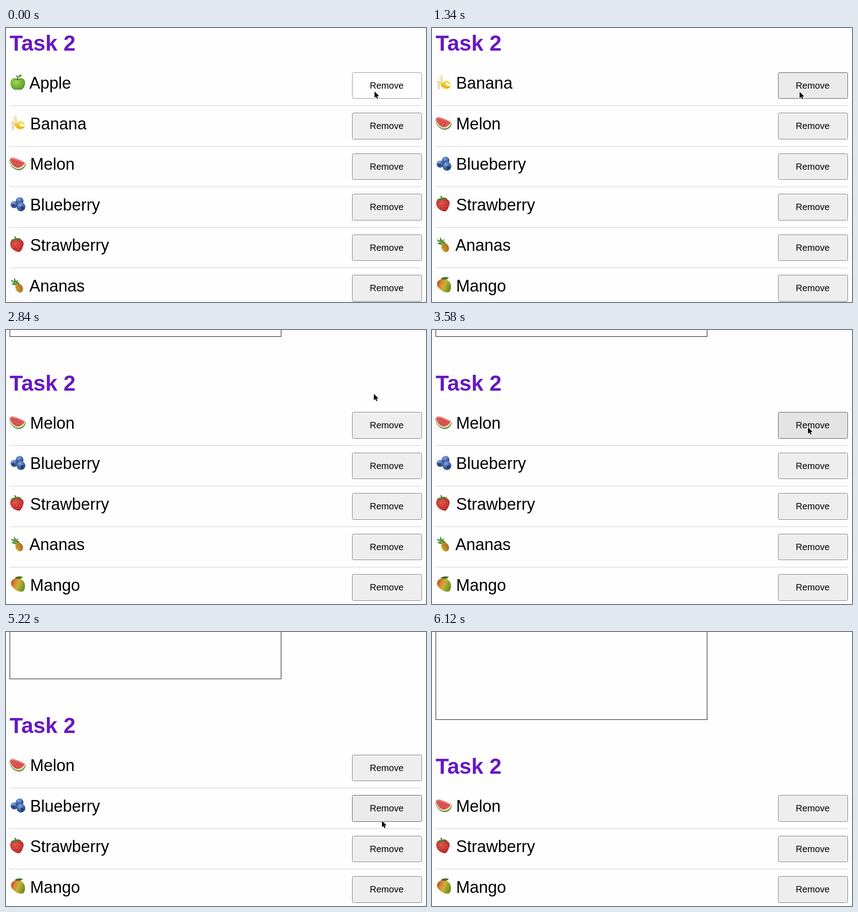
An HTML page that plays this animation: 926x605 px, repeating every 6.87 s.

```html
<!DOCTYPE html>
<html lang="en">
<head>
<meta charset="utf-8">
<title>Task 2</title>
<style>
  html, body { margin: 0; width: 100%; height: 100%; overflow: hidden; background: #fefefe; }
  svg { display: block; }
  text { font-family: "Liberation Sans", Arial, sans-serif; }
  .title { font-size: 47.8px; font-weight: bold; fill: #6718c3; }
  .name { font-size: 36px; }
  .label { font-size: 20px; text-anchor: middle; }
</style>
</head>
<body>
<svg width="926" height="605" viewBox="0 0 926 605">
  <defs>
    <radialGradient id="green" cx=".4" cy=".35" r=".7"><stop stop-color="#a5d653"/><stop offset="1" stop-color="#4d9623"/></radialGradient>
    <radialGradient id="blue" cx=".4" cy=".25" r=".8"><stop stop-color="#86a9e0"/><stop offset=".5" stop-color="#4569ab"/><stop offset="1" stop-color="#243e78"/></radialGradient>
    <radialGradient id="red" cx=".4" cy=".35" r=".7"><stop stop-color="#e5534a"/><stop offset="1" stop-color="#ad2226"/></radialGradient>
    <linearGradient id="mango" x1="0" y1=".2" x2="1" y2=".6"><stop stop-color="#c23a20"/><stop offset=".3" stop-color="#d98a30"/><stop offset=".55" stop-color="#c4b237"/><stop offset="1" stop-color="#6f8a22"/></linearGradient>
    <linearGradient id="gold" x2="1"><stop stop-color="#e9b63c"/><stop offset="1" stop-color="#a8701c"/></linearGradient>

    <!-- Each fruit fills a 36 by 36 box. -->
    <g id="Apple">
      <path d="M18 11C13 8 3 8 2 19C1 28 8 36 14 35Q18 34 22 35C29 36 35 27 34 18C33 8 23 8 18 11Z" fill="url(#green)"/>
      <path d="M11 11Q18 15 25 11Q18 12 11 11Z" fill="#3f7d1b"/>
      <path d="M18 13Q18 7 15 3" fill="none" stroke="#6b4a25" stroke-width="2"/>
      <path d="M18 8Q19 1 27 1Q26 8 18 8Z" fill="#569c2a"/>
    </g>
    <g id="Banana">
      <path d="M9 3Q11 1 14 3Q17 10 17 20L10 22Q7 11 9 3Z" fill="#f4e9c4"/>
      <path d="M14 4Q15 13 14 21" fill="none" stroke="#decd94" stroke-width="1.2"/>
      <path d="M10 15Q3 15 1 18Q4 19 5 22Q3 29 6 35L9 34Q9 26 13 21Z" fill="#ecdcb0"/>
      <path d="M11 19Q17 21 22 14Q20 23 26 26Q31 28 34 25Q31 34 21 33Q11 30 11 19Z" fill="#f3c92b"/>
      <path d="M20 15Q29 13 33 21L32 25Q27 18 20 20Z" fill="#f8db58"/>
      <path d="M13 24Q19 31 31 29" fill="none" stroke="#d9a51b" stroke-width="1.5"/>
    </g>
    <g id="Melon">
      <path d="M0 11Q1 24 13 30Q27 36 36 19Q31 35 17 33Q1 28 0 11Z" fill="#4c8d35" stroke="#4c8d35"/>
      <path d="M0 11Q2 23 14 28.500Q26 32 35 17L35 20Q27 33 15 30.500Q1 25 0 11Z" fill="#d6e5a0"/>
      <path d="M1 10Q3 5 8 6Q21 9 34 17Q26 30 15 28Q3 23 1 10Z" fill="#dd5655"/>
      <path d="M4 7Q15 8 33 17" fill="none" stroke="#ef8a80" stroke-width="2"/>
      <path d="M10 13v1M16 16v1M22 18v1M12 21v1M19 24v1" stroke="#70302c" stroke-width="1.3" stroke-linecap="round"/>
    </g>
    <g id="Blueberry">
      <circle cx="10" cy="20" r="7.800" fill="url(#blue)"/>
      <circle cx="22" cy="12" r="8.500" fill="url(#blue)"/>
      <circle cx="25" cy="25" r="9.700" fill="url(#blue)"/>
      <path d="M4 20l4 0 2-2 1 3 2 2-4 0-2 2-1-3Z" fill="#1f3565"/>
      <path d="M24 25l3 0 3-2 0 4 2 2-4 1-2 2-1-4Z" fill="#1f3565"/>
    </g>
    <g id="Strawberry">
      <path d="M3 11Q9 5 20 6Q31 9 31 17Q29 29 22 35Q11 35 4 26Q-1 17 3 11Z" fill="url(#red)"/>
      <path d="M6 18v1M12 17v1M20 16v1M26 17v1M8 24v1M15 23v1M22 23v1M14 30v1M20 29v1M27 23v1" stroke="#e9a56d" stroke-width="1.2" stroke-linecap="round"/>
      <path d="M2 10Q6 6 12 6L10 1L13 1L15 5Q20 3 26 7Q21 8 19 8L20 11Q17 10 15 8Q12 10 9 13L9 9Z" fill="#4a7d30"/>
    </g>
    <g id="Ananas">
      <path d="M16 19Q8 20 3 15Q8 15 9 14Q4 12 3 7Q8 9 10 10Q9 5 10 2Q13 6 14 10Q17 7 20 7Q17 10 17 12Q20 12 22 14L20 18Z" fill="#4b8a35"/>
      <path d="M12 12L17 18M7 11L14 17" stroke="#8fbd4e" stroke-width="1.3"/>
      <ellipse cx="21" cy="25.500" rx="8" ry="10.500" transform="rotate(-28 21 25.500)" fill="url(#gold)"/>
      <path d="M13 22L27 32M15 18L29 28M14 28L23 34M23 16L14 27M27 20L18 32M29 25L23 34" stroke="#9b681d" stroke-width=".9"/>
    </g>
    <g id="Mango">
      <path d="M4 12Q8 5 18 5Q29 6 33 16Q36 27 30 34Q21 37 11 29Q0 21 4 12Z" fill="url(#mango)"/>
      <path d="M11 5Q17 -1 29 2Q25 8 18 6Q15 7 11 5Z" fill="#41752a"/>
      <path d="M18 6Q17 4 14 3" fill="none" stroke="#6b4a25" stroke-width="1.5"/>
    </g>
    <path id="cursor" d="M0 -1V13.200L3.300 10.200L5.400 15L7.800 14L5.700 9.300H10.200Z" stroke="#fff" stroke-width="2" paint-order="stroke"/>
  </defs>
  <g id="scene"></g>
</svg>
<script>
const LOOP = 6870, PITCH = 89.5;
const fruits = ['Apple', 'Banana', 'Melon', 'Blueberry', 'Strawberry', 'Ananas', 'Mango'];
const removalOrder = ['Apple', 'Banana', 'Ananas', 'Blueberry'];
const NORMAL = '#eee', SOFT = '#ebebeb', HOVER = '#e4e4e4', PRESSED = '#f5f5f5', FLASH = '#fdfdfd';
const borders = { [NORMAL]: '#767676', [SOFT]: '#4f4f4f', [HOVER]: '#4f4f4f', [PRESSED]: '#8d8d8d', [FLASH]: '#8d8d8d' };

// start time, fruits removed, pointer x and y, fill of the button below the pointer
const steps = [
  [0, 0, 812.5, 141, FLASH],
  [140, 1, 812.5, 141, SOFT],
  [440, 1, 811, 141.5, SOFT],
  [1340, 1, 810.5, 142, SOFT],
  [2240, 1, 811, 142, SOFT],
  [2690, 1, 811, 142, PRESSED],
  [2840, 2, 811, 142],
  [2990, 2, 818, 171],
  [3140, 2, 827, 207, HOVER],
  [3290, 2, 829, 215, HOVER],
  [3580, 2, 829, 216, HOVER],
  [3730, 2, 829, 236, HOVER],
  [3880, 2, 826, 310, HOVER],
  [4030, 2, 823, 405, HOVER],
  [4180, 2, 821, 460, HOVER],
  [4320, 2, 821, 466, PRESSED],
  [4470, 3, 821, 466, HOVER],
  [4770, 3, 823, 462, HOVER],
  [4920, 3, 826, 447],
  [5070, 3, 828, 430],
  [5220, 3, 829, 418, SOFT],
  [5370, 3, 829, 408, HOVER],
  [5520, 3, 829, 405, PRESSED],
  [5670, 4, 829, 405, HOVER],
  [5970, 4, 829, 456],
  [6120, 4]
];

function row(name, top, pointerY, hotFill) {
  const y = Math.round(top), bottom = Math.floor(top + 58);
  const hot = hotFill && pointerY >= y && pointerY <= bottom + 1;
  const fill = hot ? hotFill : NORMAL;
  // A capital A is kerned towards the space after the fruit.
  const nameX = name.startsWith('A') ? 51.5 : 53.3;
  return `<use href="#${name}" x="8" y="${top + 4}"/>
    <text class="name" x="${nameX}" y="${top + 36.5}">${name}</text>
    <rect x="763.5" y="${y + .5}" width="153" height="${bottom - y}" rx="3" fill="${fill}" stroke="${borders[fill]}"/>
    <text class="label" x="839.3" y="${top + 36}">Remove</text>
    <rect x="8" y="${Math.floor(top + 74)}" width="909" height="1" fill="#ccc"/>`;
}

function draw([, removed, x, y, hotFill]) {
  const gone = removalOrder.slice(0, removed);
  const list = fruits.filter(name => !gone.includes(name));
  // A short list pulls the page down so that its end stays at the window edge.
  const shift = Math.max(0, 531 - PITCH * list.length);
  const boxBottom = Math.floor(shift - 69.5) + .5;
  scene.innerHTML =
    `<rect x="8.5" y="${boxBottom - 400}" width="598" height="400" fill="none" stroke="#000"/>
     <text class="title" x="8" y="${shift + 50}">Task 2</text>` +
    list.map((name, i) => row(name, shift + 97.5 + i * PITCH, y, hotFill)).join('') +
    (x ? `<use href="#cursor" x="${x}" y="${y}"/>` : '');
}

const scene = document.getElementById('scene');
const start = performance.now();
let shown;

function tick() {
  const time = (performance.now() - start) % LOOP;
  const step = steps.findLast(([from]) => from <= time);
  if (step !== shown) draw(shown = step);
  requestAnimationFrame(tick);
}
tick();
</script>
</body>
</html>
```
